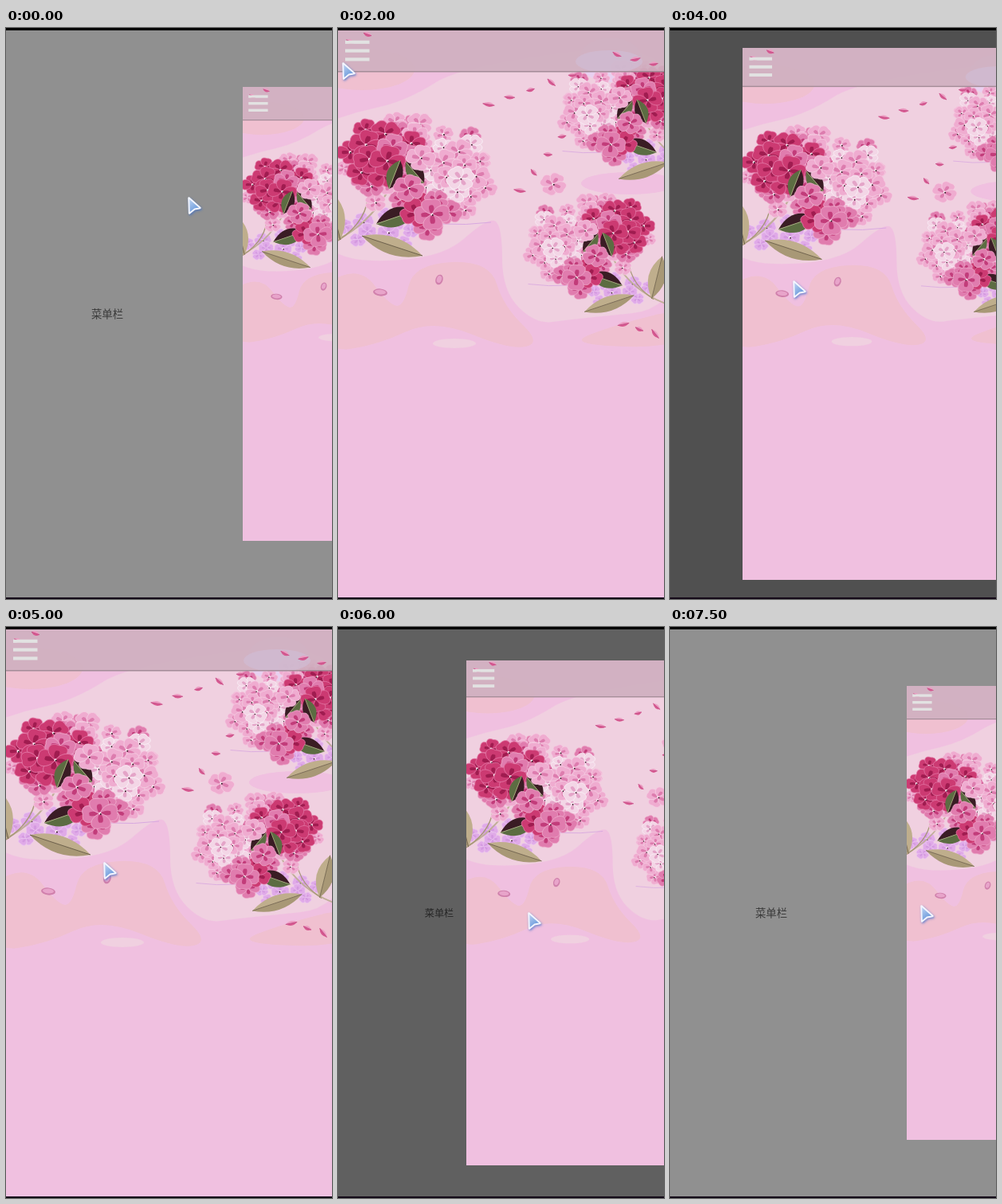
An HTML page with a canvas for the animation above (8 s loop, 409 px wide and 717 px high).

```html
<!DOCTYPE html>
<html lang="zh">
<head>
<meta charset="utf-8">
<title>Drawer menu</title>
<style>
html, body { margin: 0; width: 100%; height: 100%; overflow: hidden; background: #000; }
canvas { display: block; width: 409px; height: 717px; }
</style>
</head>
<body>
<canvas id="stage" width="409" height="717"></canvas>
<script>
const c = document.getElementById('stage').getContext('2d');
const W = 409, TOP = 3, BOTTOM = 715, MID = 359, OPEN = 297;
const STEP = .5, LOOP = 8, TURN = Math.PI * 2;

// pointer path: seconds, x, y
const path = [
  [0, 228, 212], [.5, 309, 130], [1, 304, 130], [1.5, 308, 100], [2, 5, 43], [2.5, 22, 27],
  [3, 292, 277], [3.5, 338, 300], [4, 154, 317], [5, 122, 295], [6, 238, 358], [6.5, 301, 358], [7.5, 314, 349]
];

// base, heart, rim
const deep = ['#cc3a72', '#a01c50', '#e47aa8'];
const mid = ['#e07cae', '#c23c7a', '#efaccd'];
const light = ['#efacd0', '#dd7cae', '#f5cde2'];
const white = ['#f3d6e6', '#e4a4c8', '#faf0f7'];
const lilac = ['#e0aae8', '#d49ae0', '#ecc8f0'];

function seeded(s) {
  return () => (s = (s * 16807) % 2147483647) / 2147483647;
}

function pointer(t) {
  const i = path.findLastIndex(p => p[0] <= t), a = path[i], b = path[i + 1] || a;
  const k = b === a ? 0 : (t - a[0]) / (b[0] - a[0]);
  return [a[1] + (b[1] - a[1]) * k, a[2] + (b[2] - a[2]) * k];
}

// the menu button closes the drawer at 2 s and opens it at 3 s, then the page is dragged
function offset(t, x) {
  if (t >= 2 && t < 3 || t === 5) return 0;
  if (t >= 3.5 && t < 5) return x - 63;
  if (t > 5 && t < 6.5) return x - 77;
  return OPEN;
}

function blob(color, ...pts) {
  const n = pts.length;
  c.fillStyle = color;
  c.beginPath();
  for (let i = 0; i <= n; i++) {
    const [x, y] = pts[i % n], [u, v] = pts[(i + 1) % n];
    if (i) c.quadraticCurveTo(x, y, (x + u) / 2, (y + v) / 2);
    else c.moveTo((x + u) / 2, (y + v) / 2);
  }
  c.fill();
}

function oval(color, x, y, rx, ry, turn = 0) {
  c.fillStyle = color;
  c.beginPath();
  c.ellipse(x, y, rx, ry, turn, 0, TURN);
  c.fill();
}

function curve(color, width, x, y, u, v, x2, y2) {
  c.strokeStyle = color;
  c.lineWidth = width;
  c.beginPath();
  c.moveTo(x, y);
  c.quadraticCurveTo(u, v, x2, y2);
  c.stroke();
}

// pointed leaf with one colour on each side of the vein
function leaf(x, y, x2, y2, w, one, two, vein) {
  const d = Math.hypot(x2 - x, y2 - y), nx = -(y2 - y) / d, ny = (x2 - x) / d;
  const mx = (x + x2) / 2, my = (y + y2) / 2;
  for (const [k, color] of [[-w, one], [w, two]]) {
    c.fillStyle = color;
    c.beginPath();
    c.moveTo(x, y);
    c.quadraticCurveTo(mx + nx * k * 2, my + ny * k * 2, x2, y2);
    c.fill();
  }
  curve(vein, 1, x, y, mx, my, x2, y2);
}

function petal(r, w, color) {
  c.fillStyle = color;
  c.beginPath();
  c.moveTo(0, 0);
  c.bezierCurveTo(r * .25, -r * w, r * 1.1, -r * w, r * .93, 0);
  c.bezierCurveTo(r * 1.1, r * w, r * .25, r * w, 0, 0);
  c.fill();
}

function floret(x, y, r, [base, heart, rim], turn) {
  c.save();
  c.translate(x, y);
  c.scale(1, .86);
  c.rotate(turn);
  for (let k = 0; k < 4; k++) {
    c.rotate(TURN / 4);
    petal(r, .7, base);
    c.strokeStyle = rim;
    c.lineWidth = .9;
    c.stroke();
    petal(r * .62, .3, heart);
  }
  c.restore();
  if (r > 12) {
    oval('#fff0f6', x, y, 1.6, 1.6);
    oval('#301020', x + .8, y + .8, 1, 1);
  }
}

// florets on a sunflower spiral inside an ellipse, outermost first
function tuft(rnd, tones, x, y, rx, ry, n, r) {
  for (let i = n; i--;) {
    const d = Math.sqrt((i + .4) / n), a = i * 2.4 + .6;
    const size = r * (1.1 - .3 * d) * (.85 + .3 * rnd());
    floret(x + Math.cos(a) * d * rx, y + Math.sin(a) * d * ry, size, tones[i % tones.length], rnd() * TURN);
  }
}

function bouquet() {
  const rnd = seeded(71);
  const tan = ['#bfae8c', '#a89876', '#6c6048'], dark = ['#3a1c24', '#5c6c42', '#a8b080'];

  tuft(rnd, [lilac], 55, 254, 52, 24, 11, 13);
  curve('#c0ae98', 2.2, -20, 274, 32, 256, 62, 206);
  curve('#a89878', 1.5, 0, 267, 42, 240, 38, 196);
  curve('#d8a8e0', 1, 130, 246, 160, 248, 192, 244);
  leaf(-13, 202, 3, 266, 13, ...tan);
  leaf(30, 261, 106, 286, 11, ...tan);

  tuft(rnd, [light, light, mid], 98, 176, 94, 60, 24, 16);
  tuft(rnd, [white, light, light], 148, 185, 44, 46, 17, 18);
  tuft(rnd, [light, mid], 90, 130, 28, 18, 5, 17);
  tuft(rnd, [deep, deep, mid], 55, 163, 48, 40, 13, 21);
  leaf(78, 166, 64, 202, 10, ...dark);
  leaf(85, 168, 108, 195, 10, ...dark);
  leaf(48, 246, 98, 229, 12, ...dark);
  tuft(rnd, [mid, deep, mid], 112, 230, 28, 28, 6, 20);
  floret(89, 201, 20, mid, .4);
  floret(104, 163, 19, light, .2);
}

function mirrored(x, y) {
  c.save();
  c.translate(x, y);
  c.scale(-.82, .83);
  bouquet();
  c.restore();
}

// a trail of n loose petals between two points
function drift(rnd, n, x, y, x2, y2) {
  for (let i = 0; i < n; i++) {
    const k = n > 1 ? i / (n - 1) : 0, len = 5 + rnd() * 2.5;
    c.save();
    c.translate(x + (x2 - x) * k, y + (y2 - y) * k);
    c.rotate((rnd() - .4) * 1.4);
    leaf(-len, -1, len, 1, 2.8, '#ec9cc2', '#d65890', '#c85088');
    c.restore();
  }
}

function wallpaper() {
  const pink = '#f0c0e0', soft = '#f0d0e0', peach = '#f0c0d0';
  c.fillStyle = pink;
  c.fillRect(-9, -9, W + 18, BOTTOM + 18);
  oval(peach, 30, 52, 66, 26);
  blob(soft, [-40, 128], [20, 106], [85, 92], [160, 45], [460, 10], [450, 350], [290, 366], [248, 372],
    [206, 330], [206, 250], [190, 236], [125, 294], [-40, 290]);
  oval(pink, 365, 195, 60, 14);
  oval('#e8d0f0', 342, 40, 40, 28);
  blob(peach, [-20, 320], [30, 302], [62, 345], [82, 352], [95, 296], [190, 292], [208, 350], [256, 396],
    [215, 404], [120, 365], [50, 398], [-20, 408]);
  blob(peach, [282, 398], [350, 372], [440, 350], [440, 402]);
  oval(soft, 146, 396, 27, 6);
}

function header() {
  c.fillStyle = 'rgba(208,176,192,.93)';
  c.fillRect(-9, -9, W + 18, 64);
  oval('rgba(208,190,216,.6)', 340, 42, 42, 14);
  c.fillStyle = '#a48c98';
  c.fillRect(0, 54, W, 1.5);
}

function page(x) {
  const s = 1 - .2 * x / OPEN, half = (BOTTOM - TOP) / 2 * s;
  const top = Math.round(MID - half), bottom = Math.round(MID + half);
  const rnd = seeded(12);
  c.save();
  c.beginPath();
  c.rect(Math.round(x), top, W, bottom - top);
  c.clip();
  c.translate(x, MID);
  c.scale(s, s);
  c.translate(0, -MID);
  wallpaper();
  mirrored(439, -48);
  bouquet();
  mirrored(396, 119);
  floret(270, 196, 17, light, .5);
  header();
  drift(rnd, 2, 15, 17, 37, 8);
  drift(rnd, 3, 350, 33, 396, 45);
  drift(rnd, 1, 87, 77);
  drift(rnd, 5, 189, 96, 294, 59);
  drift(rnd, 4, 281, 136, 228, 204);
  drift(rnd, 3, 358, 372, 398, 384);
  drift(rnd, 1, 92, 330);
  for (const [px, py, r, turn] of [[53, 332, 9, .1], [127, 316, 6.5, 1.9]]) {
    oval('#d080ac', px, py, r, 4.6, turn);
    oval('#e8a4ca', px, py - .5, r - 2, 3, turn);
  }
  c.fillStyle = '#e2e2e2';
  for (let i = 0; i < 3; i++) c.fillRect(9, 15.7 + i * 10.8, 30.5, 4.2);
  c.restore();
}

function backdrop(x) {
  const p = x / OPEN, s = .8 + .2 * p;
  const grey = Math.round((55 + 88 * p) / 16) * 16, ink = grey * .4;
  c.fillStyle = `rgb(${grey},${grey},${grey})`;
  c.fillRect(0, TOP, W, BOTTOM - TOP);
  c.fillStyle = `rgb(${ink},${ink},${ink})`;
  c.font = `${13.4 * s}px "Noto Sans CJK SC", "Noto Sans CJK", sans-serif`;
  c.textAlign = 'center';
  c.fillText('菜单栏', 127, MID + 5 * s);
}

function cursor(x, y) {
  c.save();
  c.translate(x + 1.5, y + 1.5);
  c.lineJoin = 'round';
  c.beginPath();
  c.moveTo(0, 0);
  c.lineTo(14, 12.5);
  c.lineTo(7, 13.8);
  c.lineTo(.6, 19);
  c.closePath();
  c.strokeStyle = '#f4f6ff';
  c.lineWidth = 2.4;
  c.shadowColor = 'rgba(60,110,200,.8)';
  c.shadowBlur = 3;
  c.shadowOffsetX = 1;
  c.shadowOffsetY = 1.5;
  c.stroke();
  c.shadowColor = 'transparent';
  const g = c.createLinearGradient(0, 4, 9, 15);
  g.addColorStop(0, '#b4cdf0');
  g.addColorStop(1, '#6e9cdc');
  c.fillStyle = g;
  c.fill();
  c.lineWidth = 1.4;
  c.stroke();
  c.restore();
}

function draw(t) {
  const [cx, cy] = pointer(t), x = offset(t, cx);
  c.fillStyle = '#000';
  c.fillRect(0, 0, W, TOP);
  c.fillStyle = '#140a18';
  c.fillRect(0, BOTTOM, W, 2);
  backdrop(x);
  page(x);
  cursor(cx, cy);
}

let shown = -1;
const start = performance.now();
function tick(now) {
  const time = Math.max(0, now - start) / 1000 % LOOP;
  const t = Math.floor(time / STEP) * STEP;
  if (t !== shown) draw(shown = t);
  requestAnimationFrame(tick);
}
tick(start);
</script>
</body>
</html>
```
